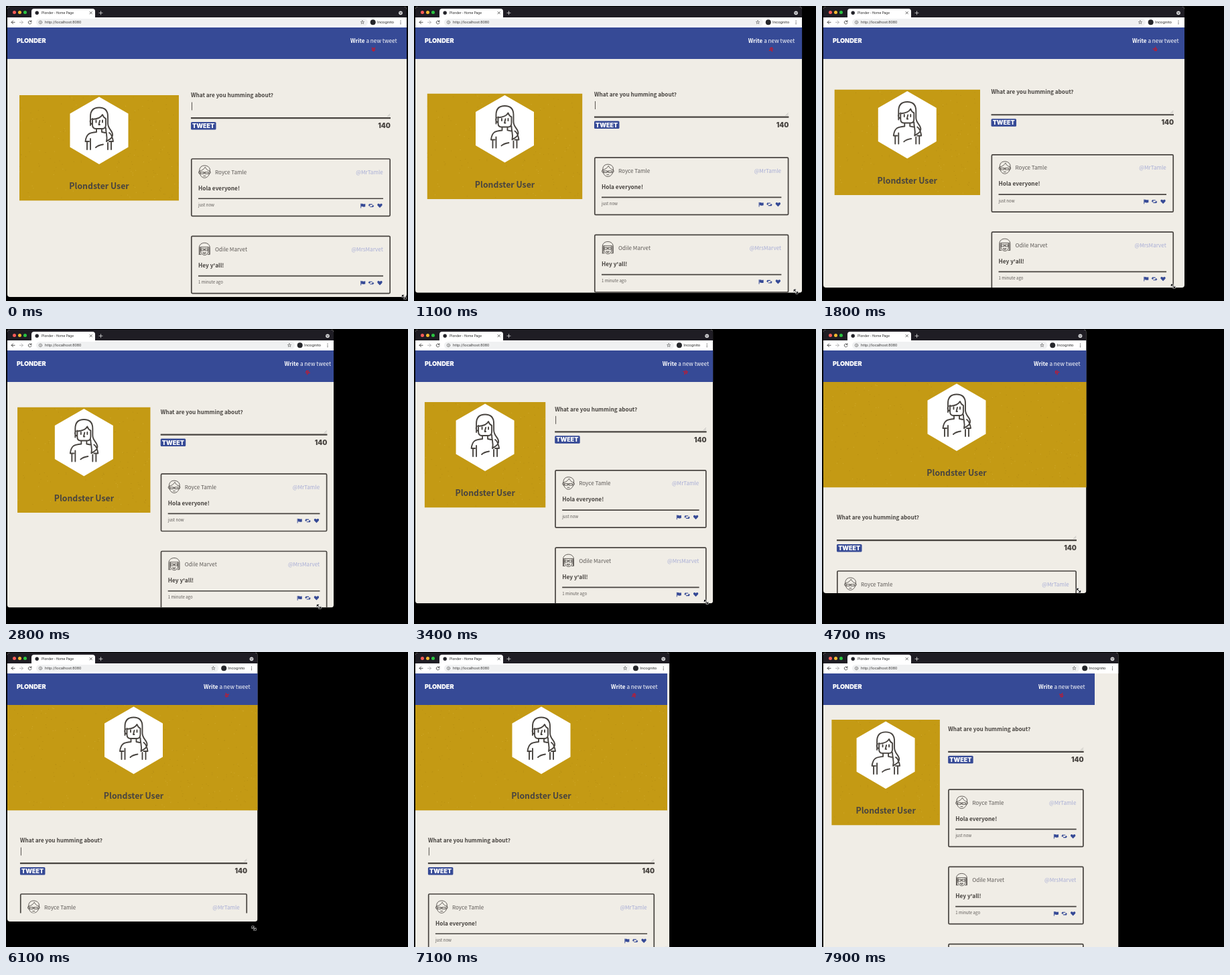
These frames come from a looping animation (600 px wide and 440 px high, 8000 ms). An HTML page with a canvas:

```html
<!DOCTYPE html>
<html lang="en">
<head>
<meta charset="utf-8">
<title>Resizing a browser window</title>
<style>
html, body { margin: 0; width: 100%; height: 100%; overflow: hidden; background: #000; }
canvas { display: block; }
</style>
</head>
<body>
<canvas id="stage" width="600" height="440"></canvas>
<script>
const ctx = document.getElementById('stage').getContext('2d');
const BEIGE = '#f0ede6', BLUE = '#364a96', GOLD = '#c49a14', INK = '#484440', SOFT = '#5f5b58';
const SANS = '"Noto Sans CJK JP", "Noto Sans CJK SC", "Noto Sans CJK", "Open Sans", sans-serif';
const UI = 'Roboto, sans-serif', BLOCK = 'Inter, sans-serif';

// Rows of [time, value, ...]
const windowSize = [[0, 598, 434], [400, 597, 433.5], [900, 590, 430], [1800, 541, 420], [2800, 489, 415.5],
  [3600, 432, 407], [4100, 413.5, 402.5], [4700, 394.5, 394], [5400, 382, 388], [5700, 376, 389],
  [6100, 375.5, 402], [6400, 376, 420], [7200, 382, 446], [7900, 442.5, 450]];
const pageSize = [[0, 598, 434], [400, 598, 434], [900, 593, 431], [1800, 547, 421], [2800, 499.5, 416.5],
  [3600, 440, 408.5], [4100, 419, 404], [4700, 400, 395], [5400, 384, 389], [6100, 379, 389.5],
  [6500, 378, 412], [7200, 378, 445], [7600, 390, 450], [7900, 407, 450]];
const pointer = [[0, 594, 434], [400, 593, 433], [900, 583, 428], [1800, 524, 418], [2800, 467, 414],
  [4100, 400, 399], [4700, 383, 390], [5400, 371, 387], [6100, 370, 412], [6400, 372, 423], [7200, 378, 446]];

function at(keys, t) {
  const i = keys.findIndex(k => k[0] > t);
  if (i < 0) return keys[keys.length - 1].slice(1);
  const a = keys[i - 1], b = keys[i], p = (t - a[0]) / (b[0] - a[0]);
  return a.slice(1).map((v, n) => v + (b[n + 1] - v) * p);
}

function rect(x, y, w, h, color, r = 0) {
  ctx.fillStyle = color;
  ctx.beginPath();
  ctx.roundRect(x, y, w, h, r);
  ctx.fill();
}

function dot(x, y, r, color) {
  ctx.fillStyle = color;
  ctx.beginPath();
  ctx.arc(x, y, r, 0, 7);
  ctx.fill();
}

function text(s, x, y, size, color, weight = 400, align = 'left', family = SANS) {
  ctx.font = `${weight} ${size}px ${family}`;
  ctx.textAlign = align;
  ctx.fillStyle = color;
  ctx.fillText(s, x, y);
  return ctx.measureText(s).width;
}

// Path data drawn relative to (x, y)
function line(d, x, y, color, width) {
  ctx.save();
  ctx.translate(x, y);
  ctx.strokeStyle = color;
  ctx.lineWidth = width;
  ctx.lineCap = ctx.lineJoin = 'round';
  ctx.stroke(new Path2D(d));
  ctx.restore();
}

function shape(d, x, y, color) {
  ctx.save();
  ctx.translate(x, y);
  ctx.fillStyle = color;
  ctx.fill(new Path2D(d));
  ctx.restore();
}

function drawChrome(right) {
  rect(2, 1, right - 2, 31, '#1f1d24', [4, 4, 0, 0]);
  ['#fc5b57', '#f5b92f', '#2ac440'].forEach((c, i) => dot(12.5 + 8 * i, 9.5, 2.5, c));
  rect(38, 4, 95, 14, '#fff', [4, 4, 0, 0]);
  dot(46.2, 10.2, 2.7, '#24242a');
  text('Plonder - Home Page', 53, 12.2, 5.1, '#333', 400, 'left', UI);
  line('M-1.7-1.7L1.7 1.7M1.7-1.7L-1.7 1.7', 126.7, 10.2, '#444', 0.8);
  line('M-2.5 0H2.5M0-2.5V2.5', 141.5, 10.3, '#ddd', 0.8);
  dot(right - 9, 10.3, 2.9, '#d4d4d6');
  line('M-1.2-.5L0 .8L1.2-.5', right - 9, 10.3, '#1f1d24', 0.8);

  rect(2, 17, right - 2, 15, '#fff');
  line('M2.6 0H-2.4M0-2.4L-2.4 0L0 2.4', 10.5, 24.3, '#444', 0.9);
  line('M-2.6 0H2.4M0-2.4L2.4 0L0 2.4', 23, 24.3, '#b0b0b2', 0.9);
  line('M1.9-1.3A2.4 2.4 0 1 0 2.3 .8M2.2-2.6V-1H.6', 35.7, 24.3, '#444', 0.9);
  rect(45, 19, right - 103, 10.6, '#f0f1f2', 5.3);
  line('M2.3 0A2.3 2.3 0 1 1-2.3 0A2.3 2.3 0 1 1 2.3 0M0-.1V1M0-1.1V-1', 51.5, 24.3, '#666', 0.7);
  text('http://localhost:8080', 58, 26.3, 5.85, '#444', 400, 'left', UI);
  line('M0-2.6L.8-.8L2.6-.7L1.2 .5L1.7 2.4L0 1.3L-1.7 2.4L-1.2 .5L-2.6-.7L-.8-.8Z', right - 66, 24.2, '#555', 0.6);
  dot(right - 50.3, 24.3, 4, '#26272b');
  text('Incognito', right - 44, 26.4, 6, '#333', 400, 'left', UI);
  for (let i = -1; i < 2; i++) dot(right - 9, 24.3 + i * 2.2, 0.65, '#444');
}

function drawHeader(right, t) {
  rect(2, 32, right - 2, 47, BLUE);
  text('PLONDER', 16, 54.6, 9.2, '#fff', 900, 'left', BLOCK);
  const end = right - 14.5;
  const rest = text(' a new tweet', end, 54.5, 8.2, '#fff', 300, 'right');
  text('Write', end - rest, 54.5, 8.2, '#fff', 700, 'right');
  ctx.save();
  ctx.translate(end - 35, 64.6);
  ctx.rotate(t / 2000 * Math.PI * 2);
  line('M-2.3-2.5L0-.3L2.3-2.5M-2.3 .4L0 2.6L2.3 .4', 0, 0, '#d8121f', 1.2);
  ctx.restore();
}

function drawProfile(x, y, w) {
  const cx = x + w / 2;
  ctx.save();
  ctx.beginPath();
  ctx.rect(x, y, w, 157.5);
  ctx.clip();
  rect(x, y, w, 157.5, GOLD);
  let seed = 7;
  const rnd = () => (seed = seed * 16807 % 2147483647) / 2147483647;
  for (let i = 0; i < 420; i++) {
    rect(cx + (rnd() - 0.5) * 400, y + rnd() * 157, 1, 1, i % 3 ? 'rgba(90,60,0,.12)' : 'rgba(255,235,150,.2)');
  }
  ctx.restore();
  shape('M0 2.5L43.5 27.5V77.5L0 103L-43.5 77.5V27.5Z', cx, y, '#fff');
  line(`M-13 45V32C-13 23-8 18.5 0 18.5C9 18.5 13 24 13 32V42C13 51 21 53 20 60C19 66 14 66 11 69
    C13 61 10 58 10 49M-10 36C-3 35.5 3 33 5 29C6 32 8 34 10 35
    M-10 35V44C-10 49-8 50-5 50H5C9 50 10 48 10 44V35M-12 36C-14 37-14 42-11 43
    M-4.5 37.5V40.5M5 37.5V40.5M1 38L-.5 44H1
    M-4 50V55C-14 56-19 57-20.5 69H-15M4 50V55L9 56M15 56C18 58 20 62 21 69H15
    M-18 69V81M-13 65V81M18 69V81M13 71V81M-5 78C-2 75 3 74 6 73.5`, cx, y, INK, 1.9);
  text('Plondster User', cx, y + 140.2, 12.3, INK, 600, 'center');
}

function drawForm(x, y, right, t) {
  text('What are you humming about?', x, y + 3.2, 8.2, INK, 600);
  if (t % 1000 < 500) rect(x + 1, y + 10.5, 0.9, 12, INK);
  rect(x, y + 33, right - x, 2.2, INK);
  line('M-2.6 1.2L1 -2.4M-.6 1.2L1-.4', right - 2, y + 30.5, '#999', 0.5);
  rect(x, y + 40, 37.5, 11.5, BLUE, 1.5);
  text('TWEET', x + 18.7, y + 49.1, 9, '#fff', 900, 'center', BLOCK);
  text('140', right, y + 49.2, 10, INK, 900, 'right', BLOCK);
}

const faces = [
  `M-7.5-1C-8-7-4-9.3 0-9.3C5-9.3 9-6 8-1C8 5 4 9 0 9C-4 9-7.5 5-7.5-1M-7.5-1C-3-2-1-4 1-7C3-3 5-2 8-1
   M-6 .5H-1V3H-5.5ZM1 .5H6V3H1ZM-1 1H1M-1.5 6.2H1.5M-8-1C-9.5 0-9 3-7 3.2M8-1C9.5 0 9 3 7 3.2`,
  `M-8 8V-2C-8-7-4-9.3 0-9.3C5-9.3 8-6 8-2V8H5M-8 8H-5M-5.5-3V4C-5 7-2 9 0 9C3 9 5 7 5.5 4V-3
   M-5.5-3H5.5M-7-3V7M7-3V7M-5-.5H-1V2.3H-5ZM1-.5H5V2.3H1ZM-1 .2H1M-2.2 5.3H2.2L1 6.8H-1Z`
];

function drawCard(x, y, right, face, name, handle, message, when) {
  ctx.strokeStyle = INK;
  ctx.lineWidth = 1.7;
  ctx.beginPath();
  ctx.roundRect(x + 0.8, y + 0.3, right - x - 1.6, 85.3, 1.5);
  ctx.stroke();
  line(faces[face], x + 20.3, y + 19.6, INK, 0.85);
  text(name, x + 36, y + 22.9, 8.1, SOFT, 300);
  text(handle, right - 11.3, y + 22.9, 8.1, '#a9aed6', 300, 'right');
  text(message, x + 11, y + 46.8, 8.3, INK, 600);
  rect(x + 11, y + 58.7, right - x - 22, 1.7, INK);
  text(when, x + 11, y + 71.2, 6.1, SOFT, 300);
  const iy = y + 70;
  line('M-3-2.7V3.3', right - 41.3, iy, BLUE, 0.9);
  shape('M-2.6-2.5C-1-3.6 0-1.5 3.6-2.7V1.5C0 2.8-1 .6-2.6 1.7Z', right - 41.3, iy, BLUE);
  line('M-2.7 .6V-1.8H1.2M2.7-.6V1.8H-1.2', right - 29, iy, BLUE, 1.1);
  shape('M-4.5-.1H-.9L-2.7-2.3ZM4.5 .1H.9L2.7 2.3Z', right - 29, iy, BLUE);
  shape('M0 3.4L-3 .4C-5-2-2-4.3 0-1.8C2-4.3 5-2 3 .4Z', right - 16, iy, BLUE);
}

function drawPage(right, t) {
  const width = right - 2, lost = 598 - right, wide = right > 403;
  const px = part => 2 + width * part;
  const [left, end] = wide ? [px(0.4597), px(0.9597)] : [px(0.0503), px(0.9497)];
  const cards = wide ? 227.7 - lost * 0.12 : 360.7;
  drawHeader(right, t);
  if (wide) drawProfile(px(0.0302), 133 - lost * 0.168, width * 0.3993);
  else drawProfile(2, 79, width);
  drawForm(left, wide ? 133 - lost * 0.0955 : 281, end, t);
  drawCard(left, cards, end, 0, 'Royce Tamle', '@MrTamle', 'Hola everyone!', 'just now');
  drawCard(left, cards + 115.3, end, 1, 'Odile Marvet', '@MrsMarvet', "Hey y'all!", '1 minute ago');
  drawCard(left, cards + 230.6, end, 0, '', '', '', '');
}

function draw(now) {
  const t = Math.floor(now % 8000 / 100) * 100;
  const [right, bottom] = at(windowSize, t), [pageRight, pageBottom] = at(pageSize, t);
  const [mx, my] = at(pointer, t);
  rect(0, 0, 600, 440, '#000');
  ctx.save();
  ctx.beginPath();
  ctx.roundRect(2, 1, right - 2, bottom - 1, 4);
  ctx.clip();
  rect(2, 1, right - 2, bottom - 1, BEIGE);
  drawChrome(right);
  ctx.beginPath();
  ctx.rect(2, 32, pageRight - 2, pageBottom - 32);
  ctx.clip();
  drawPage(pageRight, t);
  ctx.restore();
  const arrow = 'M-2.5-2.5L2.5 2.5M-2.7-.2V-2.7H-.2M2.7 .2V2.7H.2';
  line(arrow, mx, my, '#fff', 1.8);
  line(arrow, mx, my, '#000', 1);
}

const start = performance.now();
function loop() {
  draw(performance.now() - start);
  requestAnimationFrame(loop);
}
loop();
</script>
</body>
</html>
```
